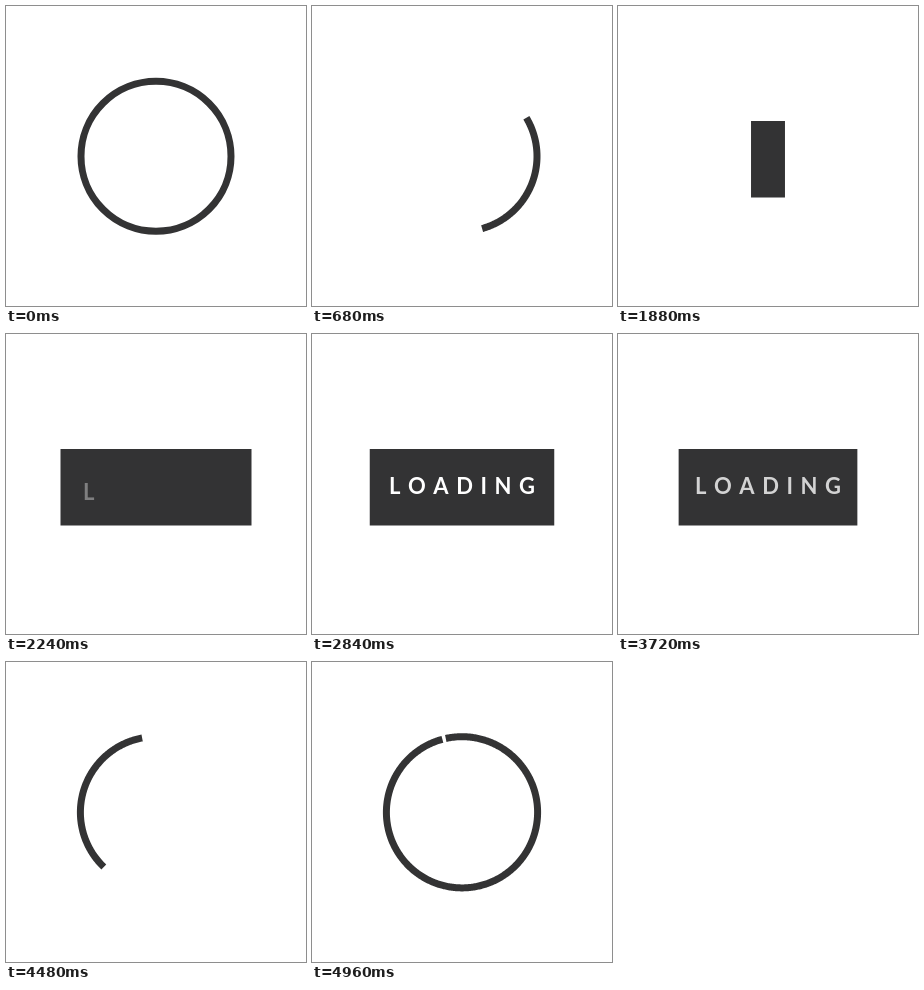
These frames come from a looping animation (300x300 px, 5 s). An HTML page with a canvas:

```html
<!DOCTYPE html>
<html lang="en">
<head>
<meta charset="utf-8">
<title>Loading</title>
<style>
html, body { margin: 0; width: 100%; height: 100%; overflow: hidden; background: #fff; }
canvas { display: block; width: 300px; height: 300px; }
</style>
</head>
<body>
<canvas id="stage"></canvas>
<script>
const LOOP = 5000, INK = '#333334';
const CX = 150, CY = 150.3, R = 75, STROKE = 7;
const TOP = 115, BOTTOM = 191.5;
const DEG = Math.PI / 180, PX = R * DEG;
const SWELL = 1.008;

const canvas = document.getElementById('stage');
const ctx = canvas.getContext('2d');
const dpr = window.devicePixelRatio || 1;
canvas.width = canvas.height = 300 * dpr;
ctx.scale(dpr, dpr);

const clamp = v => Math.min(1, Math.max(0, v));
const span = (t, a, b) => clamp((t - a) / (b - a));
const mix = (a, b, p) => a + (b - a) * p;
const sine = p => 0.5 - 0.5 * Math.cos(Math.PI * p);

// Bezier easing with flat ends: y1 = 0, y2 = 1
function ease(x, x1, x2) {
  let lo = 0, hi = 1;
  for (let i = 0; i < 30; i++) {
    const u = (lo + hi) / 2, v = 1 - u;
    if (3 * v * v * u * x1 + 3 * v * u * u * x2 + u * u * u < x) lo = u;
    else hi = u;
  }
  return lo * lo * (3 - 2 * lo);
}

// Angles run clockwise from the top
const onCircle = deg => [CX + R * Math.sin(deg * DEG), CY - R * Math.cos(deg * DEG)];

// The hook leaves the circle at its right side and ends in the vertical bar
const EXIT = 90, JOIN = 175, HANDLE = 71;
const hook = [
  [CX + R, CY],
  [CX + R, CY + HANDLE],
  [CX, JOIN + HANDLE],
  [CX, JOIN]
];

function hookAt(u) {
  const v = 1 - u, w = [v * v * v, 3 * v * v * u, 3 * v * u * u, u * u * u];
  return [0, 1].map(k => w.reduce((sum, c, i) => sum + c * hook[i][k], 0));
}

const STEPS = 200, lengths = [0];
for (let i = 1, prev = hookAt(0); i <= STEPS; i++) {
  const p = hookAt(i / STEPS);
  lengths.push(lengths[i - 1] + Math.hypot(p[0] - prev[0], p[1] - prev[1]));
  prev = p;
}
const HOOK = lengths[STEPS];

// Point at distance s along circle, hook, bar
function inward(s) {
  if (s < 0) return onCircle(EXIT + s / PX);
  if (s > HOOK) return [CX, JOIN - (s - HOOK)];
  let i = 1;
  while (i < STEPS && lengths[i] < s) i++;
  const f = (s - lengths[i - 1]) / (lengths[i] - lengths[i - 1]);
  return hookAt((i - 1 + f) / STEPS);
}

// Same route mirrored, run backwards and slightly larger
function outward(s) {
  const [x, y] = inward(HOOK - s);
  return [CX + (x - CX) * SWELL, CY - (y - CY) * SWELL];
}

function drawStroke(path, tail, head) {
  const n = Math.ceil(head - tail);
  ctx.beginPath();
  for (let i = 0; i <= n; i++) ctx.lineTo(...path(mix(tail, head, i / n)));
  ctx.stroke();
}

function drawCircle() {
  ctx.beginPath();
  ctx.arc(CX, CY, R, 0, 2 * Math.PI);
  ctx.stroke();
}

function spinIn(t) {
  const p = span(t, 100, 1760), seam = -14 - EXIT - 720;
  const tail = mix(seam * PX, HOOK + JOIN - BOTTOM, ease(p, 0.322, 0.317));
  const head = mix((seam + 360) * PX, HOOK + JOIN - TOP, ease(p, 0.533, 0.284));
  drawStroke(inward, tail, head);
}

function spinOut(t) {
  const start = 2 * CY - JOIN, enter = 180 - EXIT, seam = 347.6;
  const lap = deg => HOOK + (deg - enter) * PX;
  const tail = mix(start - BOTTOM, lap(seam + 5), sine(span(t, 3955, 4790)))
    - 5 * PX * sine(span(t, 4800, 4960));
  const head = mix(start - TOP, lap(seam + 360), sine(span(t, 3955, 5000)));
  drawStroke(outward, tail, head);
}

const WORD = [...'LOADING'];
const FONT = '700 22px Lato, "Open Sans", sans-serif';

function layout() {
  ctx.font = FONT;
  const sizes = WORD.map(c => ctx.measureText(c));
  const last = sizes.length - 1;
  const bearing = -sizes[0].actualBoundingBoxLeft;
  const ink = sizes.slice(0, last).reduce((sum, m) => sum + m.width, 0)
    + sizes[last].actualBoundingBoxRight - bearing;
  const gap = (144 - ink) / last;
  let x = 78 - bearing;
  return sizes.map(m => {
    const left = x;
    x += m.width + gap;
    return left;
  });
}

function drawWord(t) {
  const xs = layout(), out = 1 - span(t, 3690, 3830);
  ctx.fillStyle = '#fff';
  WORD.forEach((c, i) => {
    const start = 2165 + i * 77, p = span(t, start, start + 200);
    ctx.globalAlpha = p * out;
    if (p * out > 0) ctx.fillText(c, xs[i], 160 + 10 * (1 - p));
  });
  ctx.globalAlpha = 1;
}

function drawPanel(t) {
  let w = mix(STROKE, 191, sine(span(t, 1770, 2210)));
  w = mix(w, 184.5, sine(span(t, 2240, 2320)));
  w = mix(w, STROKE, sine(span(t, 3690, 3950)));
  ctx.save();
  ctx.beginPath();
  ctx.rect(CX - w / 2, TOP, w, BOTTOM - TOP);
  ctx.fillStyle = INK;
  ctx.fill();
  ctx.clip();
  drawWord(t);
  ctx.restore();
}

function frame(now) {
  const t = now % LOOP;
  ctx.fillStyle = '#fff';
  ctx.fillRect(0, 0, 300, 300);
  ctx.strokeStyle = INK;
  ctx.lineWidth = STROKE;
  if (t < 100) drawCircle();
  else if (t < 1770) spinIn(t);
  else if (t < 3955) drawPanel(t);
  else spinOut(t);
}

let origin;
function tick(now) {
  if (origin === undefined) origin = now;
  frame(now - origin);
  requestAnimationFrame(tick);
}
frame(0);
requestAnimationFrame(tick);
</script>
</body>
</html>
```
